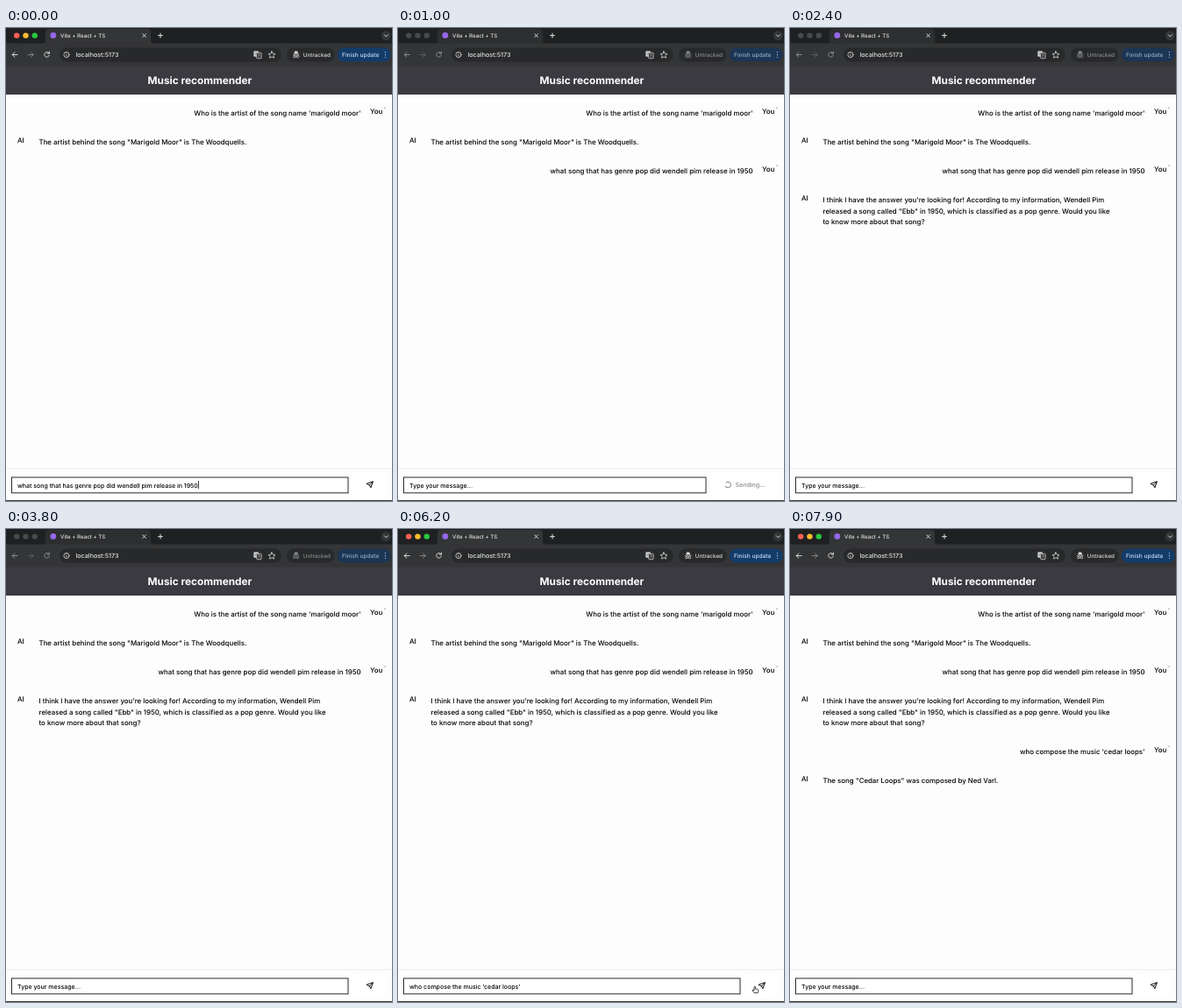
An HTML page that plays this animation: 440 px wide and 540 px high, repeating every 8000 ms.

```html
<!DOCTYPE html>
<html lang="en">
<head>
<meta charset="utf-8">
<title>Music recommender</title>
<style>
html, body { margin: 0; width: 100%; height: 100%; overflow: hidden; background: #fdfdfd; }
svg { display: block; width: 440px; height: 540px; }
text { font: 450 7.87px Inter, "Open Sans", sans-serif; text-rendering: geometricPrecision; white-space: pre; }
.end { text-anchor: end; }
.line { fill: none; stroke-width: 1; stroke-linecap: round; stroke-linejoin: round; }
#bar { --nav: #dcdcdc; --tab: #343536; --pill: #133c69; --update: #c8dcfb; }
#bar.idle { --nav: #8c8d8e; --tab: #2d2e2f; --pill: #1c3554; --update: #93abcc; }
#bar text { fill: #e3e3e3; }
#bar .line { stroke: #dcdcdc; }
#bar .nav .line { stroke: var(--nav); }
#bar .nav text { fill: var(--nav); }
#bar #update { fill: var(--update); }
</style>
</head>
<body>
<svg viewBox="0 0 440 540">
  <rect width="440" height="540" fill="#fdfdfd"/>

  <g id="bar">
    <rect width="440" height="44" fill="#1f2021"/>
    <path d="M41 18q4 0 4-4V5q0-4 4-4h112q4 0 4 4v9q0 4 4 4z" fill="var(--tab)"/>
    <rect y="17.5" width="440" height="26.5" fill="#343536"/>
    <g id="lights"><circle cx="12.2" cy="8.6" r="3.2"/><circle cx="22.5" cy="8.6" r="3.2"/><circle cx="32.8" cy="8.6" r="3.2"/></g>
    <circle cx="53.8" cy="8.4" r="3.4" fill="#9468e8"/>
    <text x="62" y="10.7" style="font-size:6.2px">Vite + React + TS</text>
    <path class="line" d="M155.8 6.8l3.6 3.6m0-3.6l-3.6 3.6M173.5 8.6h5M176 6.1v5"/>
    <circle cx="433.3" cy="8.6" r="5.6" fill="#343536"/>
    <path class="line" d="M431.3 7.8l2 2 2-2"/>
    <g class="nav">
      <path class="line" d="M13 30.5H7.2m2.7-2.7l-2.7 2.7 2.7 2.7"/>
      <path class="line" d="M25.3 30.5h5.8m-2.7-2.7l2.7 2.7-2.7 2.7" opacity=".45"/>
      <path class="line" d="M49 28.8a2.8 2.8 0 1 0 .3 2.4M49.4 27v2.1h-2.1"/>
    </g>
    <rect x="61" y="22.5" width="253" height="16" rx="8" fill="#28292a"/>
    <circle class="line" cx="69" cy="30.5" r="3.1" style="stroke-width:.8"/>
    <path class="line" d="M69 30.4v1.6M69 28.8v.1" style="stroke-width:.8"/>
    <text x="79.5" y="33.1" style="font-size:7.15px">localhost:5173</text>
    <rect x="282.3" y="26.3" width="5.6" height="6.4" rx=".8" fill="#c9cacb"/>
    <rect x="285.6" y="28.3" width="5.6" height="6.4" rx=".8" fill="#343536" stroke="#c9cacb" stroke-width=".8"/>
    <path d="M283.6 30.9l1.3-3 1.2 3m-2-1h1.6M287 30.3h3m-1.5-1v1m1 0q-.5 2-2.2 2.8m.6-1.8q.6 1.2 1.8 1.8" fill="none" stroke="#8b8c8d" stroke-width=".6"/>
    <path class="line" style="stroke-width:.8" d="M303 26.6l1.2 2.6 2.8.3-2.1 1.9.6 2.8-2.5-1.4-2.5 1.4.6-2.8-2.1-1.9 2.8-.3z"/>
    <g class="nav">
      <rect x="320" y="22.5" width="54.5" height="16" rx="8" fill="#28292a"/>
      <path d="M327 29.7h7.4v.9H327zM328.3 29.2l.8-2.6h3.2l.8 2.6z" fill="var(--nav)"/>
      <path class="line" style="stroke-width:.8" d="M330.2 32.5a1.3 1.3 0 1 1-2.6 0a1.3 1.3 0 1 1 2.6 0h1a1.3 1.3 0 1 1 2.6 0a1.3 1.3 0 1 1-2.6 0"/>
      <text x="338.8" y="33" style="font-size:6.3px">Untracked</text>
    </g>
    <rect x="377.6" y="22.5" width="61" height="16" rx="8" fill="var(--pill)"/>
    <text id="update" x="383" y="33" style="font-size:6.6px">Finish update</text>
    <path class="line" style="stroke:#a8c7fa;stroke-width:1.3" d="M432.4 27.7v.01M432.4 30.5v.01M432.4 33.3v.01"/>
  </g>

  <rect y="43.5" width="440" height="32.5" fill="#3b3a40"/>
  <text x="221" y="64.3" text-anchor="middle" fill="#fff" style="font-size:11.8px;font-weight:700">Music recommender</text>

  <g id="chat"></g>

  <path d="M0 503h440" stroke="#ececed"/>
  <rect id="button" y="507" height="29" rx="3" fill="#fff"/>
  <rect id="box" x="6.5" y="513" height="17.8" fill="#fff" stroke="#2a2a2a"/>
  <text id="entry" x="13" y="524.5" style="font-size:7px"></text>
  <rect id="caret" y="517" width=".8" height="9" fill="#111"/>
  <path id="plane" class="line" d="M418.2 518.1l-2.3 6.8-1.5-3-3.1-1.4zl-3.8 3.8" stroke="#111"/>
  <g id="wait">
    <path id="spin" class="line" d="M3.1 1A3.3 3.3 0 1 1 1-3.1" stroke="#85858a"/>
    <text x="384.4" y="524.2" fill="#8b8b90" style="font-size:7.1px">Sending...</text>
  </g>
  <rect y="539" width="440" height="1" fill="#3a3a3a"/>

  <path id="arrow" d="M0 0v7.2l1.7-1.5 1.2 2.7 1.3-.6-1.2-2.6h2.3z" fill="#111" stroke="#fff" stroke-width=".6"/>
  <path id="hand" d="M-1 .6q.9-1 1.5.2v2.2l2.7.6q.9.4.6 1.5l-.6 2.5H-.8L-2.9 5q-.2-1.1.9-.8l1 .6z" fill="#fff" stroke="#111" stroke-width=".8"/>
</svg>

<script>
const LOOP = 8000;
const $ = id => document.getElementById(id);
const set = (id, attrs) => { for (const k in attrs) $(id).setAttribute(k, attrs[k]); };
const show = (id, on) => set(id, { visibility: on ? "visible" : "hidden" });

const first = "what song that has genre pop did wendell pim release in 1950";
const second = "who compose the music 'cedar loops'";
const SENT1 = 300, REPLY1 = 2300, SENT2 = 6400, REPLY2 = 7400;

// baseline, speaker, time of arrival, lines
const messages = [
  [100.4, "You", 0, "Who is the artist of the song name 'marigold moor'"],
  [133.4, "AI", 0, 'The artist behind the song "Marigold Moor" is The Woodquells.'],
  [166.4, "You", SENT1, first],
  [199.4, "AI", REPLY1,
    "I think I have the answer you're looking for! According to my information, Wendell Pim",
    'released a song called "Ebb" in 1950, which is classified as a pop genre. Would you like',
    "to know more about that song?"],
  [257.4, "You", SENT2, second],
  [290.4, "AI", REPLY2, 'The song "Cedar Loops" was composed by Ned Varl.'],
];

$("chat").innerHTML = messages.map(([y, who, , ...lines]) => {
  const you = who === "You";
  return `<g><text x="${you ? 415 : 13}" y="${y - 2.1}">${who}</text>` +
    (you ? `<rect x="431.6" y="${y - 10}" width=".8" height="1.6" fill="#777"/>` : "") +
    lines.map((s, i) => `<text class="${you ? "end" : ""}" x="${you ? 404.5 : 37.5}" y="${y + i * 12.4}">${s}</text>`).join("") +
    "</g>";
}).join("");
const rows = [...$("chat").children];

// pointer strokes: points of time, x, y
const strokes = [
  { pts: [[150, 400, 512], [300, 414, 522], [400, 415, 524], [600, 415, 524], [800, 424, 536]], hand: t => t < SENT1 },
  { pts: [[5400, 311, 516.5], [5600, 311, 516.5]], hand: () => false },
  { pts: [[6080, 380, 522], [6200, 407, 522], [6400, 412, 521], [6700, 413, 524], [7050, 413, 541]], hand: t => t < SENT2 },
];

function movePointer(t) {
  const s = strokes.find(({ pts }) => t >= pts[0][0] && t < pts.at(-1)[0]);
  const hand = !!s && s.hand(t);
  show("arrow", s && !hand);
  show("hand", hand);
  if (!s) return;
  const i = s.pts.findIndex(p => p[0] > t);
  const [a, b] = [s.pts[i - 1], s.pts[i]];
  const k = (t - a[0]) / (b[0] - a[0]);
  const e = k * k * (3 - 2 * k);
  const [x, y] = [1, 2].map(j => a[j] + (b[j] - a[j]) * e);
  set(hand ? "hand" : "arrow", { transform: `translate(${x} ${y})` });
}

function draw(t) {
  const idle = t >= 700 && t < 5550;
  const sending = (t >= SENT1 && t < REPLY1) || (t >= SENT2 && t < REPLY2);

  $("bar").classList.toggle("idle", idle);
  ["#ff5f57", "#febc2e", "#28c840"].forEach((c, i) =>
    $("lights").children[i].setAttribute("fill", idle ? "#48494a" : c));

  rows.forEach((row, i) => row.setAttribute("visibility", t >= messages[i][2] ? "visible" : "hidden"));

  let typed = "";
  if (t < SENT1) typed = first;
  else if (t >= 5600 && t < SENT2) typed = second.slice(0, Math.ceil((t - 5600) / 450 * second.length));
  $("entry").textContent = typed.replace(" '", " ‘").replace(/'$/, "’") || "Type your message...";
  show("caret", typed && t < 6150);
  set("caret", { x: 13.3 + $("entry").getComputedTextLength() });

  set("box", { width: sending ? 344.5 : 383.5 });
  set("button", sending ? { x: 356, width: 77 } : { x: 396, width: 37 });
  show("plane", !sending);
  show("wait", sending);
  set("spin", { transform: `translate(376 521.5) rotate(${t * 0.36 - 144})` });

  movePointer(t);
}

const start = performance.now();
(function tick() {
  draw((performance.now() - start) % LOOP);
  requestAnimationFrame(tick);
})();
</script>
</body>
</html>
```
